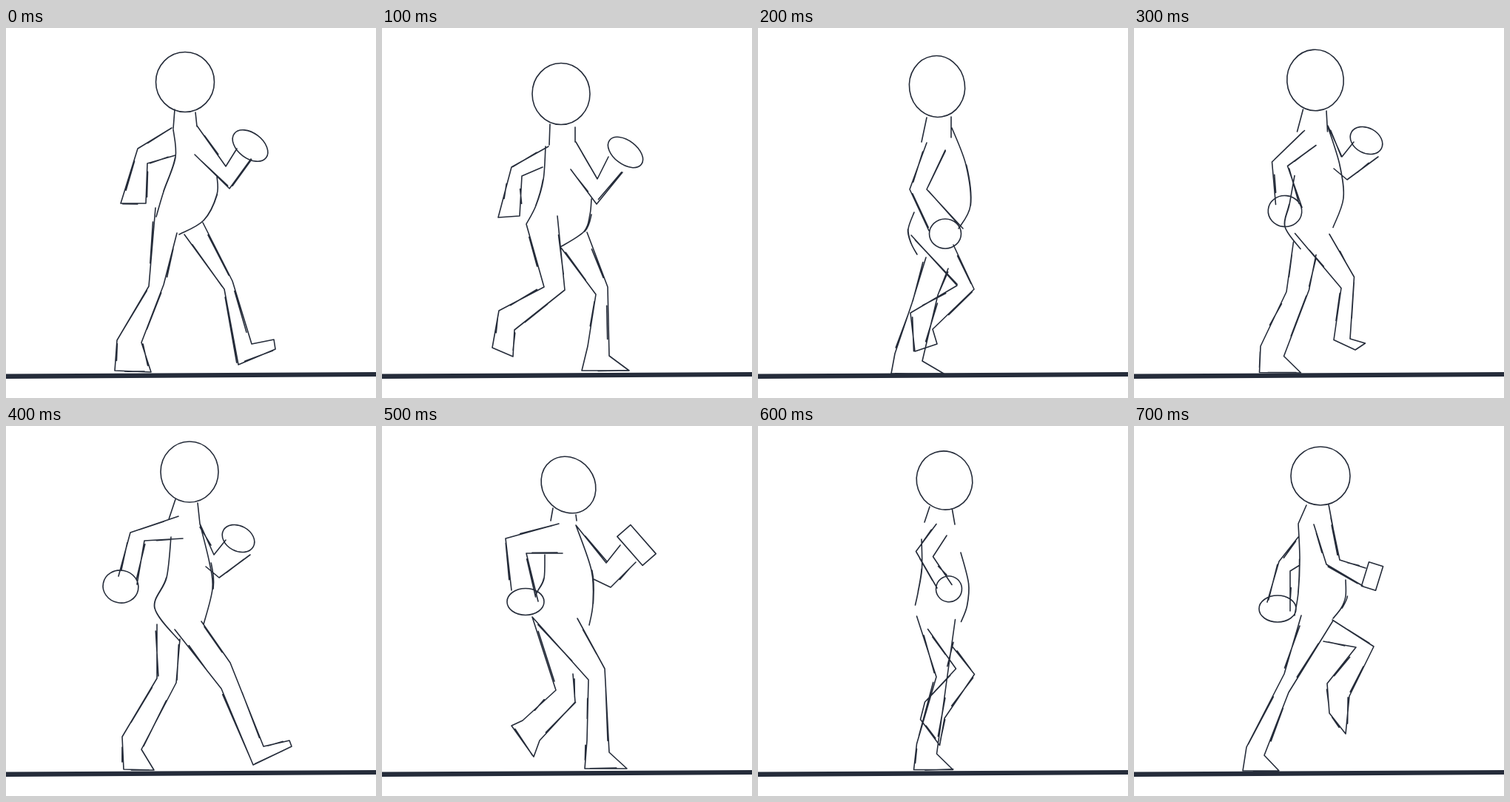
Write an HTML page with a canvas that moves like this. It is 500x500 px and loops after 800 ms.

```html
<!DOCTYPE html>
<html lang="en">
<head>
<meta charset="utf-8">
<title>Walk cycle</title>
<style>
html, body { margin: 0; width: 100%; height: 100%; overflow: hidden; background: #fff; }
canvas { display: block; width: 100vmin; height: 100vmin; }
</style>
</head>
<body>
<canvas id="stage" width="500" height="500"></canvas>
<script>
const ctx = document.getElementById("stage").getContext("2d");
const INK = "#252c3a";
const STEP = 100;

// Key poses in drawing order; a fraction is the tween of its neighbours.
const ORDER = [0, 1, 2, 2.5, 3, 4, 4.5, 5];

// Ellipses: x, y, rx, ry, tilt; a sixth value of 1 makes a box.
const head = [
  [242, 73, 39.5, 40.5, 0],
  [242, 89, 39, 41.5, 0],
  [242, 79, 37.5, 41.5, -0.15],
  [248, 62, 39, 41, 0],
  [252, 79.5, 35, 40, -0.65],
  [252, 67.5, 40, 39.5, 0]
];
const nearHand = [
  [330, 159, 27, 17, 0.65, 0],
  [329, 168, 27, 16, 0.65, 0],
  [253, 278, 21.5, 20, 0, 0],
  [155, 217, 24, 22, 0.2, 0],
  [194, 237.5, 25, 18, 0, 0],
  [322, 203, 10, 17, 0.3, 1]
];
const farHand = [
  null,
  null,
  null,
  [314, 152, 23, 17, 0.5, 0],
  [344, 161, 26, 12, 0.85, 1],
  [194, 247, 25, 18, 0, 0]
];

// Back of neck, then front of neck.
const neck = [
  [228, 110, 226, 136, 256, 114, 258, 133],
  [227, 130, 226, 158, 261, 134, 261, 154],
  [228, 121, 221, 154, 261, 120, 261, 148],
  [229, 99, 220, 126, 259, 104, 262, 132],
  [231, 111, 228, 128, 262, 120, 263, 128],
  [233, 107, 222, 132, 263, 106, 269, 138]
];

// Four points down the back, four down the belly.
const torso = [
  [226, 137, 229, 175, 213, 221, 203, 255, 285, 200, 285, 225, 267, 260, 234, 279],
  [221, 160, 218, 205, 208, 240, 195, 265, 283, 231, 281, 252, 273, 275, 241, 296],
  [211, 249, 203, 272, 207, 291, 215, 306, 262, 135, 281, 185, 287, 240, 271, 271],
  [223, 150, 217, 205, 201, 246, 235, 291, 262, 132, 275, 185, 279, 220, 267, 268],
  [220, 174, 219, 206, 211, 222, 208, 228, 262, 134, 283, 195, 285, 240, 280, 269],
  [222, 132, 224, 180, 222, 225, 217, 256, 286, 208, 286, 230, 280, 246, 269, 260]
];

// Shoulder, elbow, wrist, then back up the other side.
const nearArm = [
  [255, 171, 302, 217, 331, 177, 312, 163, 297, 187, 258, 132],
  [255, 191, 290, 238, 325, 195, 306, 174, 291, 204, 262, 154],
  [228, 155, 205, 218, 231, 274, 277, 271, 228, 218, 253, 165],
  [233, 122, 168, 144, 152, 203, 177, 214, 187, 155, 239, 152],
  [239, 132, 167, 152, 175, 222, 211, 237, 195, 172, 244, 172],
  [243, 133, 260, 187, 309, 216, 313, 192, 278, 181, 266, 124]
];
const farArm = [
  [224, 135, 178, 163, 155, 237, 189, 237, 191, 183, 229, 172],
  [225, 160, 175, 188, 157, 256, 186, 254, 189, 200, 217, 188],
  null,
  [262, 132, 281, 174, 297, 154, 330, 174, 288, 205, 270, 190],
  [262, 134, 303, 185, 322, 161, 343, 184, 309, 218, 286, 207],
  [222, 150, 196, 183, 180, 238, 211, 250, 211, 196, 224, 188]
];

// Hip, knee, ankle, two foot points, ankle, knee, hip.
const stanceLeg = [
  [202, 243, 193, 349, 150, 422, 147, 463, 196, 465, 183, 425, 213, 347, 231, 277],
  [242, 297, 289, 360, 278, 430, 270, 463, 334, 463, 307, 443, 305, 350, 277, 276],
  [227, 310, 208, 372, 185, 440, 180, 467, 251, 467, 222, 450, 243, 361, 257, 325],
  [204, 268, 204, 341, 157, 420, 159, 464, 200, 465, 183, 437, 230, 347, 235, 288],
  [203, 258, 279, 343, 277, 425, 274, 463, 331, 463, 307, 441, 301, 328, 264, 260],
  [226, 256, 203, 335, 152, 434, 147, 466, 196, 466, 176, 445, 209, 360, 269, 263]
];
const swingLeg = [
  [241, 279, 295, 353, 314, 455, 364, 434, 362, 421, 332, 427, 306, 342, 266, 263],
  [195, 265, 219, 350, 158, 382, 149, 432, 177, 444, 179, 408, 247, 354, 237, 254],
  [207, 280, 269, 348, 206, 385, 212, 437, 242, 427, 236, 407, 292, 353, 264, 293],
  [228, 275, 291, 355, 334, 458, 386, 433, 383, 425, 348, 433, 303, 320, 264, 264],
  [203, 258, 235, 357, 190, 398, 175, 405, 205, 447, 213, 425, 261, 373, 258, 335],
  [256, 291, 300, 299, 261, 348, 264, 388, 286, 416, 291, 365, 324, 298, 268, 262]
];

let seed = 1;
function jitter(size) {
  seed = (seed * 16807) % 2147483647;
  return (seed / 2147483647 * 2 - 1) * size;
}

function pick(rows, key) {
  const a = rows[Math.floor(key)], b = rows[Math.ceil(key)];
  return a && b ? a.map((v, i) => v + (b[i] - v) * (key % 1)) : b;
}

function points(row) {
  const pts = [];
  for (let i = 0; i < row.length; i += 2) pts.push([row[i], row[i + 1]]);
  return pts;
}

// Straight strokes; long ones are gone over a second time.
function sketch(path, pts) {
  pts.forEach(([x, y], i) => i ? path.lineTo(x, y) : path.moveTo(x, y));
  for (let i = 1; i < pts.length; i++) {
    const [x, y] = pts[i - 1], dx = pts[i][0] - x, dy = pts[i][1] - y;
    if (Math.hypot(dx, dy) < 34) continue;
    const from = 0.2 + jitter(0.15), to = 0.8 + jitter(0.2);
    path.moveTo(x + dx * from + jitter(2), y + dy * from + jitter(1));
    path.lineTo(x + dx * to + jitter(2), y + dy * to + jitter(1));
  }
}

// Catmull-Rom curve, with a second pass over its middle.
function curve(path, pts) {
  const at = i => pts[Math.max(0, Math.min(pts.length - 1, i))];
  const run = (first, last, dx) => {
    path.moveTo(at(first)[0] + dx, at(first)[1]);
    for (let i = first; i < last; i++) {
      const [a, b, c, d] = [at(i - 1), at(i), at(i + 1), at(i + 2)];
      path.bezierCurveTo(
        b[0] + (c[0] - a[0]) / 6 + dx, b[1] + (c[1] - a[1]) / 6,
        c[0] - (d[0] - b[0]) / 6 + dx / 2, c[1] - (d[1] - b[1]) / 6,
        c[0] + dx / 2, c[1]);
    }
  };
  run(0, pts.length - 1, 0);
  run(1, 2, 1 + jitter(1.5));
}

function oval(path, [x, y, rx, ry, tilt, box]) {
  const shape = new Path2D();
  if (box > 0.5) shape.rect(-rx, -ry, rx * 2, ry * 2);
  else shape.ellipse(0, 0, rx, ry, 0, 0, Math.PI * 2);
  path.addPath(shape, new DOMMatrix().translate(x, y).rotate(tilt * 180 / Math.PI));
}

function arm(path, row, hand) {
  const pts = points(row);
  sketch(path, pts.slice(0, 3));
  sketch(path, pts.slice(3));
  if (hand) oval(path, hand);
  else sketch(path, [pts[2], pts[3]]);
}

function figure(key) {
  const path = new Path2D();
  seed = 101 + key * 1000;
  oval(path, pick(head, key));
  const throat = points(pick(neck, key));
  sketch(path, throat.slice(0, 2));
  sketch(path, throat.slice(2));
  const body = points(pick(torso, key));
  curve(path, body.slice(0, 4));
  curve(path, body.slice(4));
  const far = pick(farArm, key);
  // The far arm swings behind the body here.
  if (far && key !== 4.5) arm(path, far, pick(farHand, key));
  arm(path, pick(nearArm, key), pick(nearHand, key));
  sketch(path, points(pick(stanceLeg, key)));
  sketch(path, points(pick(swingLeg, key)));
  return path;
}

const drawings = ORDER.map(figure);

function drawGround() {
  ctx.beginPath();
  ctx.moveTo(0, 467.5);
  ctx.lineTo(500, 465);
  ctx.lineTo(500, 471);
  ctx.lineTo(0, 474);
  ctx.fill();
}

function draw() {
  const i = Math.floor(performance.now() / STEP) % drawings.length;
  ctx.fillStyle = "#fff";
  ctx.fillRect(0, 0, 500, 500);
  ctx.fillStyle = ctx.strokeStyle = INK;
  ctx.lineWidth = 1.6;
  ctx.lineCap = ctx.lineJoin = "round";
  drawGround();
  ctx.stroke(drawings[i]);
  requestAnimationFrame(draw);
}
draw();
</script>
</body>
</html>
```
